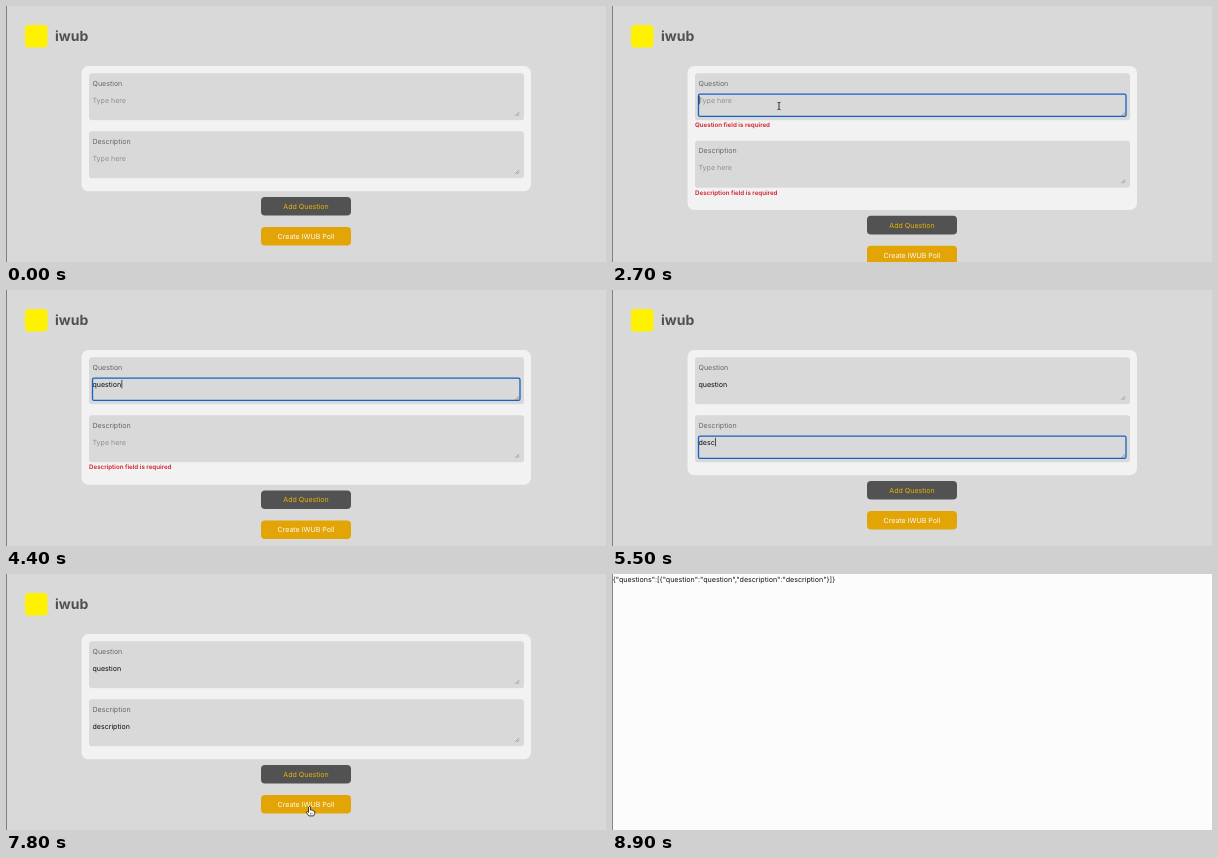
These frames come from a looping animation (600 by 256 pixels, 9800 ms). An HTML page:

```html
<!DOCTYPE html>
<html lang="en">
<head>
<meta charset="utf-8">
<title>Poll form</title>
<style>
  html, body { margin: 0; width: 100%; height: 100%; overflow: hidden; background: #d9d9d9; }
  svg { display: block; width: 600px; height: 256px; }
  text { font-family: Inter, Roboto, sans-serif; text-rendering: geometricPrecision; white-space: pre; }
</style>
</head>
<body>
<svg id="stage" viewBox="0 0 600 256"></svg>
<script>
const LOOP = 9800, STEP = 100, BODY_SIZE = 7.05, ERROR_HEIGHT = 9.4;
const SUBMIT = 2200, FOCUS_QUESTION = 2500, FOCUS_DESCRIPTION = 4500, BLUR = 7800, RESULT = 7900;

const stage = document.getElementById('stage');
const ruler = document.createElement('canvas').getContext('2d');

const fields = [
  { label: 'Question', value: 'question', focus: [FOCUS_QUESTION, FOCUS_DESCRIPTION],
    keys: [3600, 3700, 3800, 3900, 4000, 4100, 4200, 4300] },
  { label: 'Description', value: 'description', focus: [FOCUS_DESCRIPTION, BLUR],
    keys: [4800, 4900, 5100, 5500, 5600, 5700, 5900, 6000, 6200, 6300, 6500] },
];

// Pointer journeys: each is a list of [time, x, y]; the pointer is hidden outside them.
const journeys = [
  [[100, 340, 140], [1000, 301, 228], [2200, 300.5, 228], [2500, 167, 100], [3600, 167, 100]],
  [[6800, 167, 100], [7600, 303.5, 232.5], [8100, 303.5, 232.5], [8500, 262, 204.5],
   [8700, 262, 204.5], [8800, 320, 225], [8900, 320, 225]],
];

const rect = (x, y, w, h, fill, r = 0, more = '') =>
  `<rect x="${x}" y="${y}" width="${w}" height="${h}" rx="${r}" fill="${fill}" ${more}/>`;

const text = (x, y, content, fill, size = BODY_SIZE, more = '') =>
  `<text x="${x}" y="${y}" font-size="${size}" fill="${fill}" ${more}>${content}</text>`;

function textWidth(content) {
  ruler.font = '100px Inter, Roboto, sans-serif';
  return ruler.measureText(content).width * BODY_SIZE / 100;
}

function drawField({ label, value, focus, keys }, y, t, hasError) {
  const typed = value.slice(0, keys.filter(k => k <= t).length);
  const focused = t >= focus[0] && t < focus[1];
  let out = rect(83, y, 435, 47, '#d9d9d9', 3);
  out += text(86.5, y + 12.3, label, '#666');
  out += typed ? text(86.5, y + 29.2, typed, '#0a0a0a') : text(86.5, y + 29.2, 'Type here', '#8b8f97');
  out += `<path d="M509.5 ${y + 42.5}l3.5 -3.5M511.5 ${y + 42.5}l1.5 -1.5" stroke="#777" stroke-width=".7"/>`;
  if (focused) {
    out += rect(86.5, y + 20.9, 427.5, 22.2, 'none', 1.5, 'stroke="#1463c4" stroke-width="1.3"');
    const lastInput = Math.max(focus[0], ...keys.filter(k => k <= t));
    if ((t - lastInput) % 1000 < 500)
      out += rect(86.8 + textWidth(typed), y + 22.5, 0.7, 8.5, '#111');
  }
  if (hasError)
    out += text(83, y + 54, label + ' field is required', '#cf1f2b', 6.2, 'font-weight="600"');
  return out;
}

const drawButton = (y, label, fill, color) =>
  rect(255, y, 90, 18.6, fill, 4) +
  text(300, y + 12, label, color, BODY_SIZE, 'text-anchor="middle"');

function drawForm(t) {
  const errors = fields.map(({ keys }) => t >= SUBMIT && t < keys[0]);
  const shift = errors[0] ? ERROR_HEIGHT : 0;
  const total = shift + (errors[1] ? ERROR_HEIGHT : 0);
  return rect(0, 0, 600, 256, '#d9d9d9') +
    rect(19, 19, 22.5, 22.5, '#fff200', 4) +
    text(49, 35.2, 'iwub', '#505050', 14, 'font-weight="700"') +
    rect(75.5, 60, 449.5, 125.3 + total, '#f2f2f2', 7) +
    drawField(fields[0], 67.3, t, errors[0]) +
    drawField(fields[1], 125.3 + shift, t, errors[1]) +
    drawButton(191 + total, 'Add Question', '#525252', '#eab308') +
    drawButton(221 + total, 'Create IWUB Poll', '#e3a506', '#fafafa');
}

const drawResult = () => {
  const answer = Object.fromEntries(fields.map(f => [f.label.toLowerCase(), f.value]));
  return rect(0, 0, 600, 256, '#fcfcfc') +
    text(0.8, 8.4, JSON.stringify({ questions: [answer] }), '#111', 7.1);
};

function pointerAt(t) {
  const path = journeys.find(j => t >= j[0][0] && t < j[j.length - 1][0]);
  if (!path) return null;
  const i = path.findIndex(p => p[0] > t);
  const [t0, x0, y0] = path[i - 1], [t1, x1, y1] = path[i];
  const u = (t - t0) / (t1 - t0), eased = u * u * (3 - 2 * u);
  return [x0 + (x1 - x0) * eased, y0 + (y1 - y0) * eased];
}

const pointerShapes = {
  hand: `<path d="M-1 .6Q0 -.6 1 .6V3.6Q2 3 2.7 3.9Q3.6 3.5 4.1 4.4Q5.2 4.3 5.2 5.4V7L4.2 9.4H-.6
    L-3 6.2Q-3.2 4.8 -2 5.1L-1 6Z" fill="#fff" stroke="#111" stroke-width=".8"/>
    <path d="M1 6.2V8M2.5 6.2V8" stroke="#111" stroke-width=".5"/>`,
  beam: `<path d="M-1.5 -3.6Q0 -3.6 0 -2.8Q0 -3.6 1.5 -3.6M0 -2.8V2.8M-1.5 3.6Q0 3.6 0 2.8Q0 3.6 1.5 3.6"
    fill="none" stroke="#222" stroke-width=".9"/>`,
  arrow: '<path d="M0 0V8.2L1.9 6.5L3.2 9.3L4.5 8.7L3.3 6H5.9Z" fill="#111" stroke="#fff" stroke-width=".6"/>',
};

function pointerShape(x, y, t) {
  if (t >= 8200) return 'arrow';
  if (x > 255 && x < 345 && ((y > 191 && y < 210) || (y > 221 && y < 240))) return 'hand';
  const overField = (y > 88 && y < 111) || (y > 146 && y < 169);
  return overField ? 'beam' : 'arrow';
}

function drawPointer(t) {
  const at = pointerAt(t);
  if (!at) return '';
  const [x, y] = at;
  return `<g transform="translate(${x} ${y})">${pointerShapes[pointerShape(x, y, t)]}</g>`;
}

let shown = -1;
function frame() {
  const t = Math.floor(performance.now() % LOOP / STEP) * STEP;
  if (t !== shown) {
    shown = t;
    stage.innerHTML = (t < RESULT ? drawForm(t) : drawResult()) +
      rect(0, 0, 0.8, 256, '#6b6b6b') + drawPointer(t);
  }
  requestAnimationFrame(frame);
}
frame();
</script>
</body>
</html>
```
